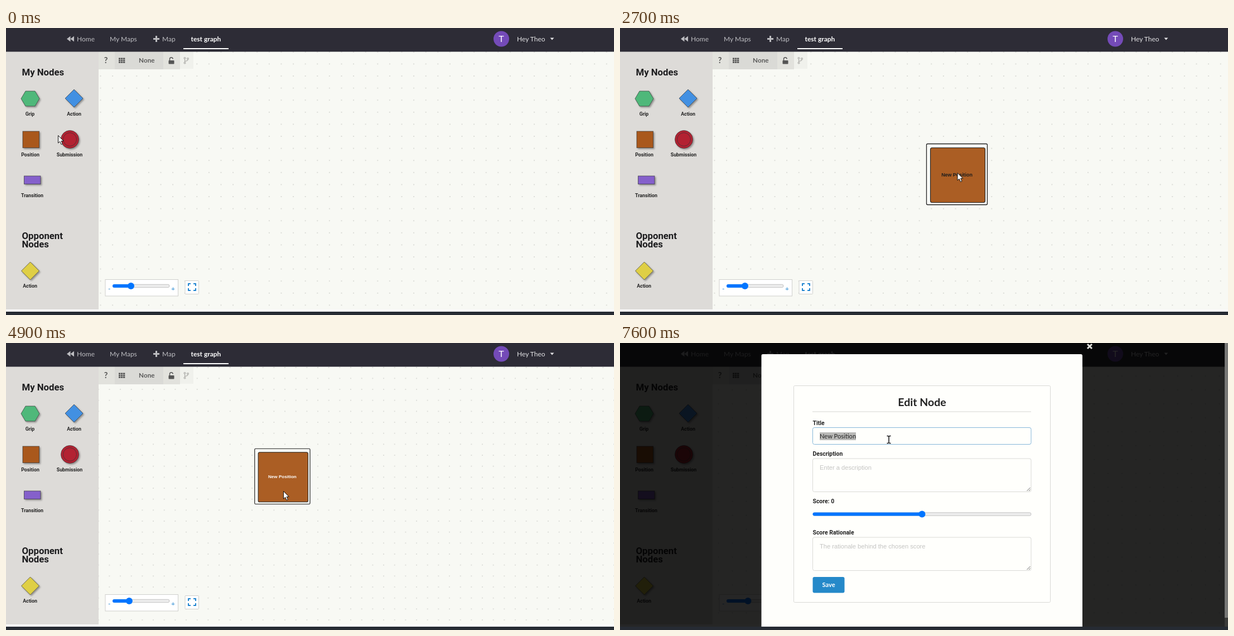
These frames come from a looping animation (1090x514 px, 8 s). An HTML page:

```html
<!DOCTYPE html>
<html lang="en">
<head>
<meta charset="utf-8">
<title>Node editor</title>
<style>
html, body { margin: 0; width: 100%; height: 100%; overflow: hidden; background: #fff; }
svg { display: block; width: 100vw; height: 100vh; }
text { white-space: pre; }
.lato { font: 12px Lato, sans-serif; }
.bold { font-weight: 700; }
.mid { text-anchor: middle; }
.label { font: 700 8.8px Roboto, sans-serif; fill: #222; text-anchor: middle; }
.head { font: 700 16.75px Roboto, sans-serif; fill: #1c1c1e; }
.field { font: 700 10.45px Roboto, sans-serif; fill: #222; }
.hint { font: 11.15px "Liberation Sans", Arial, sans-serif; fill: #c4c4c2; }
.node { font: 700 8.9px "Liberation Sans", Arial, sans-serif; text-anchor: middle; }
.shapes > * { stroke: #333; stroke-opacity: .75; stroke-width: .9; }
.box { fill: #fffffc; stroke: #d9d9d6; }
</style>
</head>
<body>
<svg viewBox="0 0 1090 514" preserveAspectRatio="none">
  <defs>
    <pattern id="grid" width="21.6" height="21.6" patternUnits="userSpaceOnUse">
      <circle cx="10.8" cy="10.8" r=".95" fill="#d0d1cc"/>
    </pattern>
    <clipPath id="canvas"><rect x="166" y="42" width="924" height="462"/></clipPath>
    <filter id="shadow" x="-30%" y="-30%" width="170%" height="170%">
      <feDropShadow dx="2" dy="2" stdDeviation="1.5" flood-color="#000" flood-opacity=".35"/>
    </filter>
  </defs>

  <rect width="1090" height="514" fill="#fff"/>
  <g clip-path="url(#canvas)">
    <rect x="166" y="42" width="924" height="462" fill="#f8f9f4"/>
    <rect x="166" y="42" width="924" height="462" fill="url(#grid)"/>
    <g id="node">
      <rect x="-54.5" y="-54.5" width="109" height="109" rx="2" fill="#f9faf6" stroke="#222" stroke-width="1.3"/>
      <rect x="-47.5" y="-47.5" width="98" height="98" rx="3" fill="#ab5e24" stroke="#222" stroke-width="1.1"/>
      <text id="name" class="node" y="3.6">New Position</text>
    </g>
  </g>

  <!-- toolbar -->
  <rect x="166" y="42" width="146" height="32" fill="#e2e2dd"/>
  <rect x="195" y="42" width="87" height="32" fill="#dadad6"/>
  <rect x="312" y="42" width="24" height="31" fill="#f0f1ec"/>
  <text class="lato bold mid" x="179" y="63" fill="#555" style="font-size:14.5px">?</text>
  <g id="cells" fill="#555"></g>
  <text class="lato bold mid" x="252.300" y="62" fill="#5a5a5a" style="font-size:11.700px">None</text>
  <rect x="291.500" y="58" width="10" height="6.500" rx="1" fill="#555"/>
  <path d="M293.500 58V55.500a2.800 2.800 0 0 1 5.600 0" fill="none" stroke="#555" stroke-width="1.500"/>
  <g fill="none" stroke="#b2b2ae" stroke-width="1.300">
    <circle cx="320.500" cy="54" r="1.400"/><circle cx="320.500" cy="62.500" r="1.400"/><circle cx="326" cy="55" r="1.400"/>
    <path d="M320.500 55.500V61M326 56.500q0 2.500-5.500 3"/>
  </g>

  <!-- zoom controls -->
  <rect x="178" y="450.500" width="130.500" height="29.500" fill="#fff" stroke="#cfcfcc"/>
  <g class="lato" fill="#2185d0"><text x="183" y="471">-</text><text x="296" y="471">+</text></g>
  <rect x="191.500" y="459.300" width="101.500" height="5.400" rx="2.700" fill="#ededed" stroke="#b5b5b5" stroke-width=".8"/>
  <rect id="fill" x="191" y="459" height="6" rx="3" fill="#0075ff"/>
  <circle id="thumb" cy="462" r="6" fill="#0075ff"/>
  <rect x="321" y="452.500" width="24.500" height="24" rx="1" fill="#fff" stroke="#cfcfcc"/>
  <path d="M327 462V458h4M336 458h4v4M340 466v4h-4M331 470h-4v-4" fill="none" stroke="#2185d0" stroke-width="2"/>

  <!-- sidebar -->
  <rect y="42" width="166" height="462" fill="#dddbd8"/>
  <g class="head">
    <text x="28.500" y="85">My Nodes</text>
    <text x="28.500" y="378">Opponent</text>
    <text x="28.500" y="393">Nodes</text>
  </g>
  <g class="shapes" filter="url(#shadow)">
    <path d="M27 126.500L35 113H52L60 126.500L52 140H35Z" fill="#50b87a"/>
    <path d="M122 110L138 126L122 142L106 126Z" fill="#4290e2"/>
    <rect x="30" y="185" width="29.500" height="29.500" fill="#a9591c"/>
    <circle cx="114.500" cy="199.500" r="16" fill="#b32030"/>
    <circle cx="114.500" cy="199.500" r="12" fill="none"/>
    <rect x="32.500" y="265" width="29.500" height="14.500" fill="#8560cb"/>
    <path d="M43.500 419L59.500 435L43.500 451L27.500 435Z" fill="#dfcf45"/>
  </g>
  <g class="label">
    <text x="43" y="157">Grip</text><text x="122" y="157">Action</text>
    <text x="43.500" y="230">Position</text><text x="114" y="230">Submission</text>
    <text x="47" y="303">Transition</text><text x="43" y="465">Action</text>
  </g>

  <!-- header and footer -->
  <rect width="1090" height="42.500" fill="#2d2c36"/>
  <rect y="508" width="1090" height="6" fill="#262b33"/>
  <g class="lato" fill="#bcbcc0">
    <path d="M109 19.500l6.500-5v10zM115.500 19.500l6.500-5v10z"/>
    <text x="127" y="24">Home</text>
    <text x="186" y="24">My Maps</text>
    <path d="M268 14h3v4h4v3h-4v4h-3v-4h-4v-3h4z"/>
    <text x="280" y="24">Map</text>
    <text class="bold" x="331.500" y="24" fill="#fff">test graph</text>
    <rect x="318" y="36" width="81" height="2" fill="#fff"/>
    <circle cx="888" cy="19.500" r="14" fill="#744bb8"/>
    <text class="mid" x="888" y="25.300" fill="#fff" style="font-size:16px">T</text>
    <text x="916" y="24" fill="#e3e3e5">Hey Theo</text>
    <path d="M975.500 17.500h7l-3.500 4z" fill="#e3e3e5"/>
  </g>

  <!-- dialog -->
  <g id="dialog">
    <rect width="1090" height="508" fill="#000" opacity=".85"/>
    <rect x="1084" width="6" height="508" fill="#3a3a38"/>
    <rect x="1084" width="6" height="492" fill="#777775"/>
    <path d="M838 2l8 8M846 2l-8 8" stroke="#e0e0dc" stroke-width="3"/>
    <path d="M253.500 508V23q0-3 3-3H826q3 0 3 3V508Z" fill="#fefefb"/>
    <rect class="box" x="311.500" y="76.500" width="460" height="388" rx="2"/>
    <text class="lato bold mid" x="541.500" y="112.500" fill="#222" style="font-size:19.500px">Edit Node</text>
    <path d="M345 123H737" stroke="#d5d5d2"/>
    <g class="field">
      <text x="345.500" y="146.500">Title</text><text x="345.500" y="202">Description</text>
      <text x="345.500" y="287">Score: 0</text><text x="345.500" y="343">Score Rationale</text>
    </g>
    <rect id="input" class="box" x="345.500" y="151.500" width="391.500" height="30" rx="3"/>
    <rect id="mark" x="358" y="160" width="65" height="14" fill="#b9b9b7"/>
    <text class="lato" x="358" y="171" fill="#222" style="font-size:11.150px">New Position</text>
    <rect class="box" x="345.500" y="207" width="391.500" height="59.500" rx="3"/>
    <rect class="box" x="345.500" y="348" width="391.500" height="59.500" rx="3"/>
    <path d="M729.500 265l6-6M733 265l2.500-2.500M729.500 406l6-6M733 406l2.500-2.500" stroke="#555" stroke-width=".9"/>
    <text class="hint" x="358" y="227">Enter a description</text>
    <text class="hint" x="358" y="367.500">The rationale behind the chosen score</text>
    <rect x="346" y="303.800" width="391" height="5.400" rx="2.700" fill="#ededed" stroke="#b5b5b5" stroke-width=".8"/>
    <rect x="345.500" y="303.500" width="196" height="6" rx="3" fill="#0075ff"/>
    <circle cx="541.500" cy="306.500" r="6" fill="#0075ff"/>
    <rect x="345.500" y="419" width="57" height="28.500" rx="3" fill="#2589c9"/>
    <text class="lato bold mid" x="374" y="437.300" fill="#fff" style="font-size:11.150px">Save</text>
  </g>

  <!-- pointer -->
  <rect id="ghost" width="29.500" height="29.500" fill="#a9591c" opacity=".72"/>
  <path id="arrow" d="M.5.5V14L3.700 11.200L6 16.500L8.400 15.400L6.200 10.300H10.300Z" fill="#fff" stroke="#111"/>
  <path id="hand" d="M-4.500 6.500L-6.500 2.500V-.5Q-6.500-2-4.500-2V-3.500Q-3.500-6-1-4.800Q1-6.500 2.800-4.600Q5.200-5.200 5.800-3Q7-2.500 6.500 1L5 6.500Z" fill="#fff" stroke="#111" stroke-width="1.300"/>
  <g id="beam" fill="none">
    <path d="M-3.500-6.500H-1.500L0-5.500L1.500-6.500H3.500M0-5.500V5.500M-3.500 6.500H-1.500L0 5.500L1.500 6.500H3.500" stroke="#fff" stroke-width="3"/>
    <path d="M-3.500-6.500H-1.500L0-5.500L1.500-6.500H3.500M0-5.500V5.500M-3.500 6.500H-1.500L0 5.500L1.500 6.500H3.500" stroke="#111" stroke-width="1.500"/>
  </g>
</svg>
<script>
const LOOP = 8000, STEP = 100;
const $ = id => document.getElementById(id);
const set = (id, attrs) => { for (const k in attrs) $(id).setAttribute(k, attrs[k]); };
const show = (id, on) => set(id, { visibility: on ? 'visible' : 'hidden' });
const move = (id, [x, y]) => set(id, { transform: `translate(${x} ${y})` });

// Keys are [time, value, ...]; values run linearly between keys.
function at(keys, t) {
  const i = keys.findIndex(k => k[0] > t);
  if (i === 0) return keys[0].slice(1);
  if (i < 0) return keys[keys.length - 1].slice(1);
  const a = keys[i - 1], b = keys[i], f = (t - a[0]) / (b[0] - a[0]);
  return a.slice(1).map((v, j) => v + (b[j + 1] - v) * f);
}

const toIcon = [[100, 93, 192], [200, 66, 206], [300, 25, 220], [400, 37, 211]];
const ghostPath = [[600, 60, 178], [800, 260, 150], [1000, 450, 174], [1100, 501.5, 191],
  [1300, 542, 200], [1400, 540, 197], [1700, 504, 219]];
const toNode = [[1900, 505, 243], [2200, 472, 277]];
const nodePath = [[2200, 518, 306.5], [2300, 466, 277], [2500, 600, 196], [2600, 644, 224],
  [2700, 604, 262], [2900, 500, 226], [3200, 605.5, 281], [3500, 425, 181],
  [3600, 501, 204.5], [3800, 510, 214]];
const afterDrag = [[3900, 507, 213], [4000, 457, 306], [4100, 457, 306], [4200, 460, 321],
  [4500, 460, 321], [4600, 497, 265], [5300, 497, 265], [5400, 489, 265], [5700, 497, 243]];
const inDialog = [[6300, 497, 243], [6700, 486, 172], [6900, 440, 167], [7200, 452, 165.5],
  [7300, 452, 165.5], [7400, 460.5, 166], [7500, 460.5, 166], [7600, 482, 173]];
const zoomOut = [[4100, 1], [4200, .8], [4400, .715]];
const zoomIn = [[4500, 1], [5400, 1.615]];
const outAt = [460, 321], inAt = [497, 265];

function pointer(t) {
  if (t < 600) return at(toIcon, t);
  if (t < 1900) { const [x, y] = at(ghostPath, t); return [x + 1, y + 24.5]; }
  if (t < 2300) return at(toNode, t);
  if (t < 3700) { const [x, y] = at(nodePath, t); return [x + .5, y - 3]; }
  if (t < 3900) { const [x, y] = at(nodePath, t); return [x - 3, y - 1]; }
  return at(t < 6200 ? afterDrag : inDialog, t);
}

function draw(now) {
  const t = Math.floor(now % LOOP / STEP) * STEP;
  const [a] = at(zoomOut, t), [b] = at(zoomIn, t), k = a * b;
  const [tx, ty] = [0, 1].map(i => outAt[i] * (1 - a) * b + inAt[i] * (1 - b));
  const view = `translate(${tx} ${ty}) scale(${k})`;

  set('grid', { patternTransform: `${view} translate(158.7 75.2)` });
  const [nx, ny] = at(nodePath, t);
  set('node', { transform: `${view} translate(${nx} ${ny})` });
  set('name', { fill: t < 3700 ? '#1c1c1c' : '#fff' });
  show('node', t >= 1900);

  const knob = 224 + (k - 1) * 35;
  set('thumb', { cx: knob });
  set('fill', { width: knob - 191 });

  const dragging = t >= 600 && t < 1900, open = t >= 6200;
  show('dialog', open);
  show('mark', t >= 7000);
  set('input', { style: t >= 6700 ? 'stroke:#85b7d9' : '' });

  show('ghost', dragging);
  move('ghost', at(ghostPath, t));
  const kind = open ? 'beam' : dragging || t === 400 || t === 500 ? 'hand' : 'arrow';
  for (const id of ['arrow', 'hand', 'beam']) {
    show(id, id === kind);
    move(id, pointer(t));
  }
  if (!open) show('mark', false);
}

for (let i = 0; i < 9; i++) {
  const x = 202 + i % 3 * 4, y = 53.5 + Math.floor(i / 3) * 3.3;
  $('cells').insertAdjacentHTML('beforeend', `<rect x="${x}" y="${y}" width="3.300" height="2.600"/>`);
}

const start = performance.now();
function tick() {
  draw(performance.now() - start);
  requestAnimationFrame(tick);
}
tick();
</script>
</body>
</html>
```
